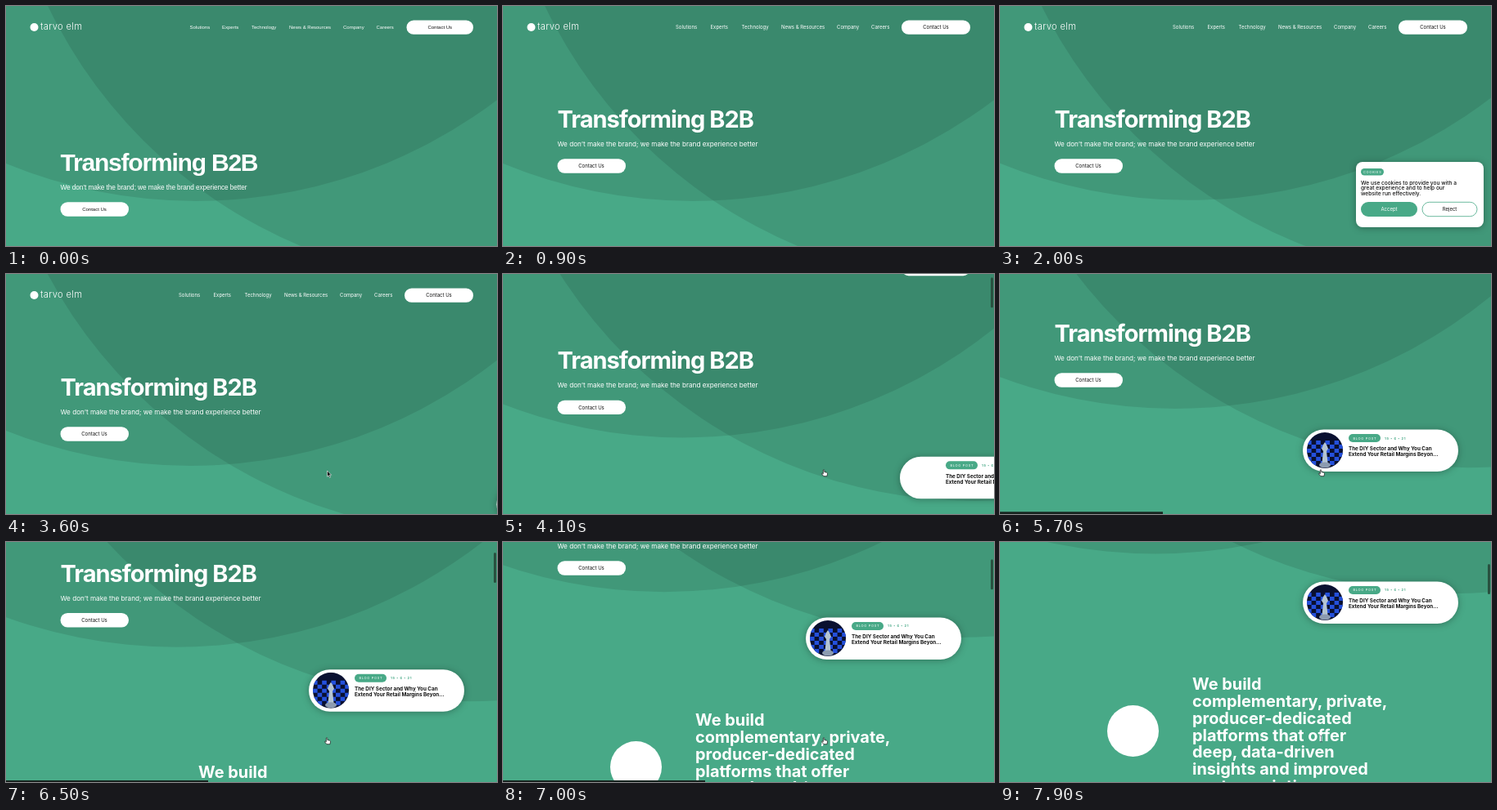
An HTML page for the animation above (8 s loop, 600 by 294 pixels).

```html
<!DOCTYPE html>
<html lang="en">
<head>
<meta charset="utf-8">
<title>Landing page tour</title>
<style>
  html, body { margin: 0; width: 100%; height: 100%; overflow: hidden; background: #48a987; }
  svg { display: block; width: 100vw; height: 100vh; font-family: Inter, "Open Sans", sans-serif; }
  text { fill: #fff; white-space: pre; }
  .h1 { font-size: 29px; font-weight: 700; letter-spacing: -.034em; }
  .sub { font-size: 8.17px; }
  .small { font-size: 6px; }
  .dark { fill: #111; }
  .fallback { font-family: "Liberation Sans", Arial, sans-serif; }
  .fallback .h1 { font-size: 30px; letter-spacing: -.04em; }
  .fallback .sub { font-size: 8.25px; letter-spacing: -.01em; }
  .brand { font-family: Inter, sans-serif; font-size: 11.2px; font-weight: 300; letter-spacing: .03em; }
  .tag { font-size: 4px; letter-spacing: .17em; }
  .date { fill: #48a987; font-weight: 700; }
  .mid { text-anchor: middle; }
  .note { font-size: 6.6px; font-weight: 500; }
  .post { font-size: 6.3px; font-weight: 700; }
  .claim { font-size: 19.9px; font-weight: 650; }
  .shadow { filter: drop-shadow(0 1px 4px rgba(0, 0, 0, .3)); }
</style>
</head>
<body>
<svg viewBox="0 0 600 294" preserveAspectRatio="none">
  <defs><clipPath id="round"><circle cx="397" cy="282" r="22"/></clipPath></defs>
  <rect width="600" height="294" fill="#48a987"/>
  <g id="page">
    <circle id="discA" r="601" opacity=".1"/>
    <circle id="discB" r="609" opacity=".1"/>
    <g id="top">
      <circle cx="34.5" cy="26" r="5" fill="#fff"/>
      <text class="brand" x="42" y="29">tarvo elm</text>
      <g id="nav"></g>
      <rect id="navPill" y="17.5" height="17.3" rx="8.6" fill="#fff"/>
      <text id="navCta" class="small dark mid" y="28.3">Contact Us</text>
      <g id="hero">
        <text class="h1" x="66.5" y="149">Transforming B2B</text>
        <text class="sub" x="66.5" y="172">We don’t make the brand; we make the brand experience better</text>
        <rect x="66.5" y="187.3" width="83.5" height="17.4" rx="8.7" fill="#fff"/>
        <text class="small dark mid" x="108" y="198.2">Contact Us</text>
      </g>
    </g>
    <circle cx="162.5" cy="439.5" r="31.5" fill="#fff"/>
    <g id="claim"></g>
    <g id="card">
      <rect class="shadow" x="370" y="256.5" width="190" height="51.5" rx="25.7" fill="#fff"/>
      <g id="photo" clip-path="url(#round)">
        <rect x="375" y="260" width="44" height="44" fill="#0a1030"/>
        <g id="checks" fill="#2450dc"></g>
        <path d="M393 302l2-19-2-3 2-5 2-3 2 3 2 5-2 3 2 19z" fill="#b4c4d2"/>
        <ellipse cx="397" cy="300" rx="7" ry="3.5" fill="#8c9bb0"/>
      </g>
      <rect x="426" y="262" width="39" height="10" rx="5" fill="#48a987"/>
      <text class="tag mid" x="445.8" y="268.5">BLOG POST</text>
      <text class="tag date" x="470" y="268.5">15 • 6 • 21</text>
      <text class="post dark" x="426" y="282.4">The DIY Sector and Why You Can</text>
      <text class="post dark" x="426" y="289.2">Extend Your Retail Margins Beyon...</text>
    </g>
  </g>
  <g id="cookies">
    <rect class="shadow" x="435" y="191" width="156" height="80" rx="8" fill="#fff"/>
    <rect x="441" y="199" width="28" height="8.4" rx="4.2" fill="#48a987"/>
    <text class="tag mid" x="455.2" y="204.6">COOKIES</text>
    <text class="note dark" x="441" y="218.6">We use cookies to provide you with a</text>
    <text class="note dark" x="441" y="225.4">great experience and to help our</text>
    <text class="note dark" x="441" y="232.2">website run effectively.</text>
    <rect x="441" y="240" width="69" height="18" rx="9" fill="#48a987"/>
    <text class="small mid" x="475.5" y="251.2">Accept</text>
    <rect x="516" y="240.3" width="67" height="17.4" rx="8.7" fill="#fff" stroke="#48a987" stroke-width=".8"/>
    <text class="small dark mid" x="549.5" y="251.2">Reject</text>
  </g>
  <rect id="bar" x="596" width="3" height="37" rx="1.5" fill="#28503f"/>
  <rect id="status" fill="#17231f"/>
  <g id="cursor" stroke-linejoin="round">
    <path id="arrow" d="M0-3v7.2l1.7-1.5 1.2 2.6 1.2-.5-1.2-2.6h2.2z" fill="#111" stroke="#fff" stroke-width=".6"/>
    <path id="hand" d="M-1.2-4q.9-.8 1.5.3v2.2l3 .8q.9.4.7 1.4l-.6 3H-.6L-3 .8q0-1 1.2-.5l.6.5z" fill="#fff" stroke="#111" stroke-width=".7"/>
    <path id="beam" d="M-1.5-4Q0-4 0-3Q0-4 1.5-4M0-3v6M-1.5 4Q0 4 0 3Q0 4 1.5 4" fill="none" stroke="#456" stroke-width=".6"/>
  </g>
</svg>
<script>
const $ = id => document.getElementById(id);
const set = (id, attrs) => { for (const k in attrs) $(id).setAttribute(k, attrs[k]); };
const show = (id, on) => set(id, { visibility: on ? 'visible' : 'hidden' });
const move = (id, x, y) => set(id, { transform: `translate(${x} ${y})` });
const ramp = (t, a, b) => Math.min(1, Math.max(0, (t - a) / (b - a)));
const easeOut = (u, p) => 1 - (1 - u) ** p;
const easeInOut = u => u < .5 ? 4 * u ** 3 : 1 - 4 * (1 - u) ** 3;
const mix = (a, b, u) => a + (b - a) * u;

const labels = ['Solutions', 'Experts', 'Technology', 'News &amp; Resources', 'Company', 'Careers'];
const navX = { plain: [224.5, 264, 300, 346, 412, 452.5], styled: [211, 253.5, 291.5, 340, 408, 450] };
$('nav').innerHTML = labels.map(s => `<text class="small" y="28.2">${s}</text>`).join('');

const lines = ['We build', 'complementary, private,', 'producer-dedicated', 'platforms that offer',
  'deep, data-driven', 'insights and improved', 'customer intimacy'];
$('claim').innerHTML = lines.map((s, i) =>
  `<text class="claim" x="235" y="${389.3 + i * 20.8}">${s}</text>`).join('');

let squares = '';
for (let r = 0; r < 6; r++)
  for (let c = r % 2; c < 8; c += 2)
    squares += `<rect x="${375 + c * 5.6}" y="${270 + r * 5}" width="5.6" height="5"/>`;
$('checks').innerHTML = squares;

function drawHeader(styled) {
  $('top').setAttribute('class', styled ? '' : 'fallback');
  const xs = styled ? navX.styled : navX.plain;
  [...$('nav').children].forEach((el, i) => el.setAttribute('x', xs[i]));
  const left = styled ? 487 : 489.5;
  set('navPill', { x: left, width: 571 - left });
  set('navCta', { x: (left + 571) / 2 });
  move('hero', 0, styled ? 0 : 53);
}

function drawCursor(t) {
  const inU = easeInOut(ramp(t, 2.1, 2.6)), outU = easeInOut(ramp(t, 2.9, 3.4));
  const x = mix(mix(530, 476, inU), 392.5, outU);
  const y = mix(mix(298, 250, inU), 244, outU);
  move('cursor', x, y - 3 * ramp(t, 7.1, 7.3));
  const overButton = t >= 2.5 && t < 3;
  const beam = t >= 7.2, hand = overButton || t >= 4.1 && !beam;
  const on = t >= 2.1;
  show('arrow', on && !hand && !beam);
  show('hand', on && hand);
  show('beam', on && beam);
}

function draw(t) {
  const scroll = 66 * easeOut(ramp(t, 3.7, 5.2), 2.2) + 142.3 * easeOut(ramp(t, 6.3, 8), 2.2);
  const drift = easeOut(ramp(t, 1.8, 3.6), 3);
  move('page', 0, -scroll);
  set('discA', { cx: 593 - 12 * drift - .14 * scroll, cy: -260 - 23 * drift - .225 * scroll });
  set('discB', { cx: 232 - 7 * drift - .17 * scroll, cy: -370 - 4 * drift - .06 * scroll });
  drawHeader(t >= .8);

  set('cookies', { opacity: ramp(t, 1.2, 1.5) * (1 - ramp(t, 2.9, 3.2)) });
  move('card', 230 * (1 - easeInOut(ramp(t, 3.5, 4.7))), 0);
  show('card', t >= 3.5);
  set('photo', { opacity: ramp(t, 4.8, 5.2) });

  set('bar', { y: scroll * .13, opacity: t < 5 ? ramp(t, 3.7, 3.8) : 1 - ramp(t, 5.2, 5.5) + ramp(t, 6.3, 6.4) });
  const late = t >= 6.4;
  set('status', { x: 0, y: late ? 292 : 291.3, width: late ? 247 : 199, height: 3 });
  show('status', t >= 5.2 && t < 7.4);
  drawCursor(t);
}

// The picture advances ten times a second.
function tick() {
  draw(Math.floor(performance.now() % 8000 / 100) / 10);
  requestAnimationFrame(tick);
}
tick();
</script>
</body>
</html>
```
